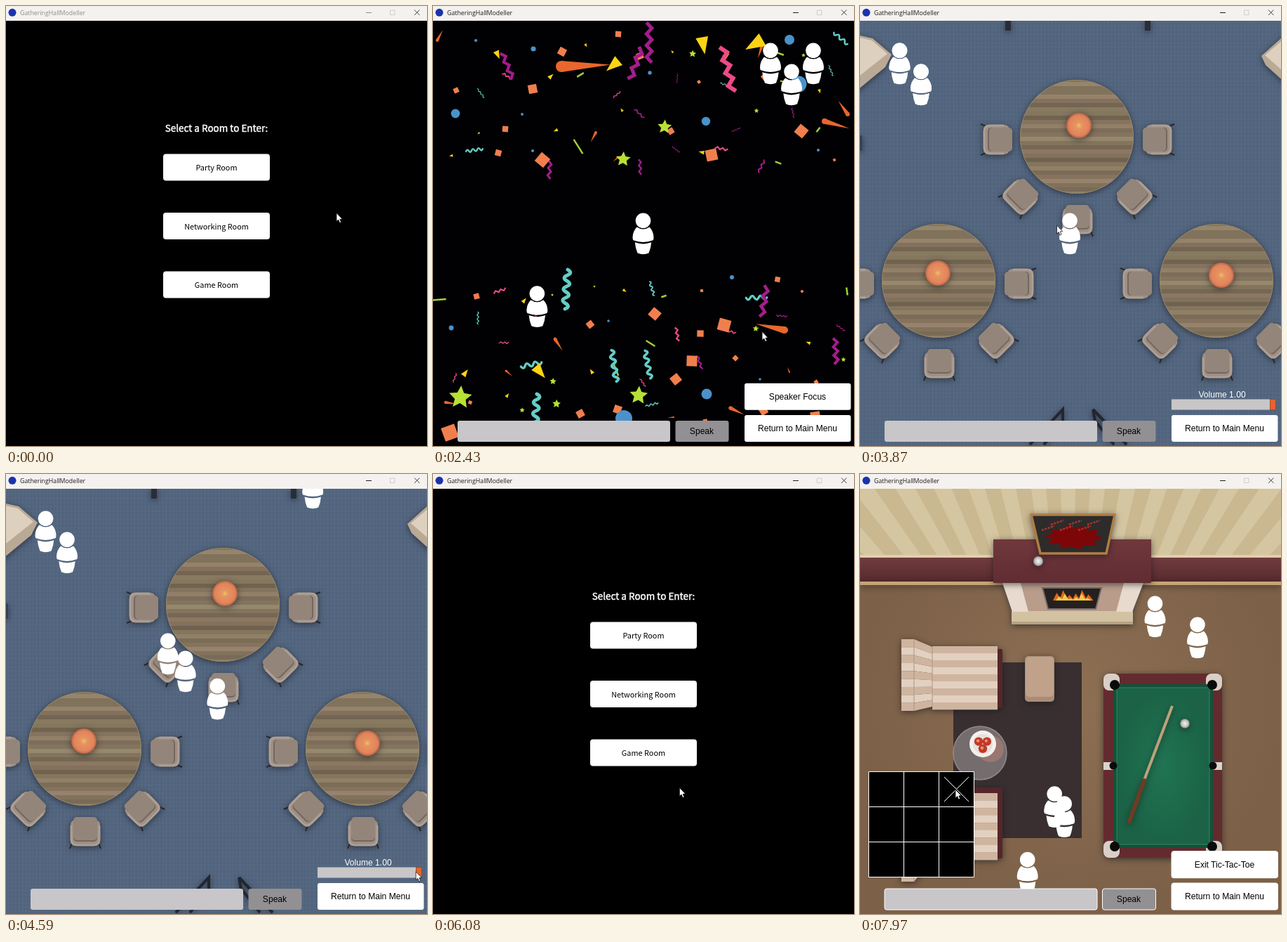
Write an HTML page that moves like this. It is 600 by 626 pixels and loops after 8000 ms.

```html
<!DOCTYPE html>
<html lang="en">
<head>
<meta charset="utf-8">
<title>Rooms</title>
<style>
html, body { margin: 0; width: 100%; height: 100%; overflow: hidden; background: #000; }
svg { display: block; width: 100%; height: 100%; }
text { text-anchor: middle; }
.ui text { font: 12.1px "Liberation Sans", Arial, sans-serif; }
.menu text { font: 10.9px "Noto Sans CJK JP", "Noto Sans CJK SC", "Noto Sans CJK", "Open Sans", sans-serif; }
.menu .head { font-size: 13.5px; fill: #fff; stroke: #fff; stroke-width: .45px; }
.bar text { font: 8.8px "Open Sans", sans-serif; text-anchor: start; }
.outlined rect { stroke: #fff; }
.shade { filter: drop-shadow(0 2px 5px rgba(18, 20, 28, .6)); }
</style>
</head>
<body>
<svg id="stage" viewBox="0 0 600 626"></svg>
<script>
const LOOP = 8000;

// ---------- drawing helpers ----------
const rect = (x, y, w, h, fill, rx = 0, more = '') =>
  `<rect x="${x}" y="${y}" width="${w}" height="${h}" rx="${rx}" fill="${fill}" ${more}/>`;
const disc = (x, y, r, fill, more = '') => `<circle cx="${x}" cy="${y}" r="${r}" fill="${fill}" ${more}/>`;
const poly = (pts, fill, more = '') => `<polygon points="${pts}" fill="${fill}" ${more}/>`;
const line = (d, stroke, w, more = '') =>
  `<path d="${d}" fill="none" stroke="${stroke}" stroke-width="${w}" ${more}/>`;
const label = (x, y, s, more = '') => `<text x="${x}" y="${y}" ${more}>${s}</text>`;
const group = (s, more = '') => `<g ${more}>${s}</g>`;
const shaded = s => group(s, 'class="shade"');
const repeat = (n, f) => Array.from({ length: n }, (_, i) => f(i)).join('');
const ring = (n, f) => Array.from({ length: n }, (_, i) => f(i)).join(' ');
const mix = (a, b, u) => a + (b - a) * u;
const polar = (x, y, r, deg) => {
  const a = deg * Math.PI / 180;
  return [+(x + r * Math.cos(a)).toFixed(1), +(y + r * Math.sin(a)).toFixed(1)];
};

function random(seed) {
  return () => (seed = (seed * 16807) % 2147483647) / 2147483647;
}

// ---------- party room ----------
const TEAL = '#64cdc6', PLUM = '#a41d8b', PINK = '#ec4a86';

// A wavy or zigzag streamer centred on x, y
function streamer(x, y, len, a, w, color) {
  const [x1, y1] = polar(x, y, -len / 2, a), round = color === TEAL;
  const n = Math.max(3, Math.round(len / (w * 1.4 + 1)));
  const at = (k, side) => polar(...polar(x1, y1, len * k / n, a), w * .75 * side, a + 90);
  let d = 'M' + at(0, round ? 0 : 1);
  for (let k = 1; k <= n; k++) {
    const side = k % 2 ? -1 : 1;
    d += round ? `Q${at(k - .5, side * 2.2)} ${at(k, 0)}` : `L${at(k, side)}`;
  }
  return line(d, color, w, round ? 'stroke-linecap="round"' : '');
}

function comet(x, y, len, a, w) {
  const tail = polar(x, y, len, a);
  return poly([polar(x, y, w / 2, a + 90), tail, polar(x, y, w / 2, a - 90)].join(' '), '#e8672c')
    + disc(x, y, w / 2, '#e8672c');
}

const dot = (x, y, r) => disc(x, y, r, '#4b92cb');
const star = (x, y, r) => poly(ring(10, i => polar(x, y, i % 2 ? r * .48 : r, i * 36 - 86)), '#b9e035');
const wedge = (x, y, r, a) => poly(ring(3, i => polar(x, y, r, a + i * 140)), '#fbd414');
const tile = (x, y, r, a) => rect(x - r, y - r, r * 2, r * 2, '#f17f4e', 0, `transform="rotate(${a} ${x} ${y})"`);
const stick = (x, y, len, a) => line(`M${polar(x, y, -len / 2, a)}L${polar(x, y, len / 2, a)}`, '#a2cf3a', 2.5);

const pieces = [
  tile, wedge, dot, star, tile, wedge,
  (x, y, r, a) => comet(x, y, r * 4, a, r),
  (x, y, r, a) => stick(x, y, r * 4, a),
  (x, y, r, a) => streamer(x, y, 8 + r * 3, a, r * .5, PLUM),
  (x, y, r, a) => streamer(x, y, 8 + r * 4, a, r * .6, TEAL),
  (x, y, r, a) => streamer(x, y, 6 + r * 3, a, r * .5, PINK)
];

// Small pieces scattered over a loose grid
function scatter(top, height, seed) {
  const rnd = random(seed), cols = 15, rows = 4;
  return repeat(cols * rows, i => {
    const x = Math.round((i % cols + .15 + .7 * rnd()) * 600 / cols);
    const y = Math.round(top + (Math.floor(i / cols) + .15 + .7 * rnd()) * height / rows);
    const r = +(1.8 + 5 * rnd() ** 1.7).toFixed(1);
    return pieces[Math.floor(rnd() * pieces.length)](x, y, r, Math.round(rnd() * 360));
  });
}

const party = () => rect(0, 21, 600, 605, '#010103') + scatter(28, 215, 71) + scatter(376, 225, 1907)
  + comet(183, 86, 70, -2, 16) + comet(501, 461, 42, 192, 10) + comet(558, 164, 37, 16, 8)
  + wedge(257, 84, 13, 0) + wedge(459, 54, 16, 10) + wedge(385, 55, 14, -60) + wedge(152, 520, 12, -90)
  + streamer(308, 52, 57, 90, 5, PLUM) + streamer(289, 82, 48, 110, 5, PLUM) + streamer(106, 85, 40, 68, 4, PLUM)
  + streamer(472, 420, 45, 99, 4.5, PLUM) + streamer(574, 491, 37, 87, 4, PLUM)
  + streamer(420, 90, 66, 77, 6, PINK) + streamer(190, 403, 56, 94, 5, TEAL) + streamer(147, 572, 40, 93, 5, TEAL)
  + streamer(258, 512, 45, 81, 4, TEAL) + streamer(306, 510, 40, 79, 3.6, TEAL)
  + tile(156, 219, 8, 40) + tile(525, 178, 7.5, 40) + tile(397, 212, 8, -12) + tile(415, 454, 8.5, 15)
  + tile(369, 505, 7.5, 2) + tile(316, 438, 7, 40) + tile(24, 607, 10, -20)
  + star(39, 557, 17) + star(293, 554, 13.5) + star(271, 218, 11) + star(330, 172, 10.5)
  + dot(521, 111, 11.5) + dot(272, 587, 12) + dot(390, 552, 7.5) + dot(508, 48, 7);

// ---------- networking room ----------
const chair = ([x, y], a) => group(
  line('M-18 14L-22 24M18 14L22 24', '#26252a', 2)
  + rect(-21, -17, 42, 37, '#9d8f84', 7)
  + line('M-20 -8V10Q-20 19 -11 19H11Q20 19 20 10V-8', '#ad9f93', 3, 'stroke-linecap="round"')
  + rect(-17, -20, 34, 34, '#74675f', 5) + rect(-17, -21, 34, 33, '#938579', 5),
  `transform="translate(${x} ${y}) rotate(${a})"`);

function table(x, y, lampX, lampY) {
  const id = 'top' + x;
  const chairs = repeat(5, i => chair(polar(x + 1, y + 4, 114, i * 45), i * 45 - 90));
  const grain = repeat(28, i => rect(x - 84, y - 84 + i * 6, 168, 6.3,
    `hsl(${35 + 3 * Math.sin(i)} 17% ${44 + 5 * Math.sin(i * 1.9) + 2 * Math.sin(i * .6)}%)`));
  return shaded(chairs) + `<clipPath id="${id}">${disc(x, y, 81)}</clipPath>`
    + shaded(group(grain, `clip-path="url(#${id})"`))
    + disc(x, y, 80.5, 'none', 'stroke="#978769"')
    + shaded(disc(lampX, lampY, 18, 'url(#lamp)'));
}

const network = () => rect(0, 21, 600, 605, '#54667f') + rect(0, 21, 600, 605, 'url(#carpet)')
  + shaded(poly('-9,40 18,46 45,69 36,87 -9,124', '#b9a995') + poly('-9,43 17,49 39,68 -9,106', '#ddd0be')
    + poly('609,38 572,71 578,84 609,112', '#b9a995') + poly('609,43 577,70 609,98', '#ddd0be'))
  + shaded(rect(207, 20, 8, 15, '#292d37') + rect(406, 20, 8, 15, '#292d37') + rect(-4, 184, 7, 22, '#353f52', 2)
    + line('M242 624L289 574V592L262 624M332 574L380 624M332 574L335 590L362 624', '#22262f', 4))
  + table(309, 186, 312, 170) + table(112, 391, 111, 380) + table(508, 391, 515, 383);

// ---------- game room ----------
// The backrest runs from an outer edge [top, bottom] to an inner one
function sofa(seatTop, seatBottom, outer, inner, legs) {
  const n = 9, h = (seatBottom - seatTop) / n, tone = i => i % 2 ? '#e2d0c0' : '#cfb5a0';
  const edge = (x, [a, b], i) => [x, mix(a, b, i / n).toFixed(1)];
  return shaded(rect(102, legs, 101, seatBottom - legs - 2, '#542629', 2)
    + repeat(n, i => rect(103, seatTop + i * h, 93, h + .3, tone(i)))
    + repeat(n, i => poly([edge(59, outer, i), edge(77, outer, i), edge(103, inner, i),
      edge(103, inner, i + 1), edge(77, outer, i + 1), edge(59, outer, i + 1)].join(' '), tone(i)))
    + line(`M77 ${outer[0]}V${outer[1]}M103 ${inner[0]}V${inner[1]}`, '#b0947e', 1));
}

function billiards() {
  const quad = f => repeat(4, i => f(i % 2, i >> 1));
  return shaded(rect(347, 284, 169, 262, '#632b2e', 9))
    + quad((u, v) => rect(347 + u * 146, 284 + v * 238, 23, 24, '#d9cfc7', 8))
    + rect(347, 410, 169, 11, '#dcd3cb')
    + rect(361, 299, 142, 233, '#14503a') + rect(366, 304, 132, 223, 'url(#felt)', 2, 'stroke="#2c8a63"')
    + quad((u, v) => disc(363 + u * 139, 300 + v * 230, 7, '#0b0b0c'))
    + disc(361, 415, 5.5, '#0b0b0c') + disc(503, 415, 5.5, '#0b0b0c')
    + shaded(line('M445 330L404 438', '#bba27c', 4) + line('M405 436L384 494', '#6c3d23', 6, 'stroke-linecap="round"')
      + disc(463, 355, 6.8, 'url(#ball)'));
}

function fireplace() {
  const flame = (n, x, w, h, fill) => repeat(n, i =>
    poly([x + i * w, 180, x + (i + .6) * w, 180 - h - 4 * Math.sin(i * 2), x + (i + 1.4) * w, 180].join(' '), fill));
  const blot = ring(28, i => {
    const a = i / 28 * 2 * Math.PI, k = 1 + .2 * Math.sin(i * 2.3);
    return [305 + 37 * k * Math.cos(a), 90 + 15 * k * Math.sin(a)].map(v => v.toFixed(1));
  });
  return shaded(poly('203,150 404,150 388,196 217,196', '#b99c8a') + rect(216, 195, 173, 19, '#d3c2a2'))
    + poly('203,155 229,155 240,196 217,196', '#e8dace') + poly('376,155 404,155 388,196 365,196', '#e8dace')
    + rect(216, 210, 173, 4, '#b6a282')
    + poly('260,162 344,162 336,192 268,192', '#25201f', 'stroke="#77706c" stroke-width="2"')
    + flame(6, 275, 9, 11, '#e0661b') + flame(6, 279, 8, 6, '#f3c94a')
    + shaded(rect(190, 93, 225, 62, 'url(#mantel)'))
    + shaded(poly('244,58 363,58 351,113 257,113', '#2d2c2b', 'stroke="#b07d45" stroke-width="3.5"'))
    + poly(blot, '#7d0708')
    + repeat(6, i => line(`M${259 + i * 13} ${80 - i % 2 * 8}l18 -6`, '#a8352f', 2.5, 'stroke-dasharray="3 1.5"'))
    + shaded(disc(254, 124, 7, 'url(#ball)'));
}

const lounge = () => rect(0, 21, 600, 605, 'url(#floor)')
  + group(rect(0, 21, 600, 97, '#d5c6a2') + repeat(27, i =>
    poly([[300, 420], polar(300, 420, 560, 193 + i * 6), polar(300, 420, 560, 196 + i * 6)].join(' '), '#cab891')),
    'clip-path="url(#wall)"')
  + rect(0, 115, 600, 4, '#e0cfaa') + rect(0, 119, 600, 34, 'url(#dado)')
  + shaded(rect(0, 153, 600, 5, '#c6a373'))
  + fireplace()
  + rect(133, 268, 183, 250, '#392f30')
  + shaded(rect(235, 259, 42, 65, '#a98d76', 5) + rect(236, 260, 40, 57, '#c0a189', 5))
  + sofa(245, 335, [235, 337], [246, 331], 249) + sofa(454, 549, [478, 580], [453, 548], 446)
  + disc(171, 397, 38, '#807779', 'opacity=".85" stroke="#a0989b" stroke-width="1.5"')
  + disc(186, 391, 19, '#a87d72', 'opacity=".7"') + disc(175, 384, 19, '#f4f0ed') + disc(175, 384, 14, '#e6e0dd')
  + repeat(3, i => {
    const [x, y] = polar(175, 384, 6.8, 90 + i * 120);
    return disc(x, y, 6.2, '#c2382b') + disc(x - 1, y - 1, 2.2, '#ee9360');
  })
  + billiards();

// ---------- interface ----------
const menuButton = (y, s) => rect(224, y, 152, 38, '#fff', 4) + label(300, y + 23.5, s);
const menu = () => rect(0, 21, 600, 605, '#000') + label(300, 178.5, 'Select a Room to Enter:', 'class="head"')
  + menuButton(210.5, 'Party Room') + menuButton(294, 'Networking Room') + menuButton(377.5, 'Game Room');

const sideButton = (y, s, more) => rect(444, y, 151.5, 38, '#fff', 3) + label(519.5, y + 23.3, s, more);
const controls = () => rect(35, 590, 303, 30, '#c8c6c9', 3) + rect(345.5, 590, 76, 30, '#929092', 3)
  + label(383, 609.3, 'Speak') + sideButton(582, 'Return to Main Menu')
  + group(sideButton(536.7, '', 'id="action"'), 'id="extra"')
  + group(label(516, 556.5, '', 'id="volume" fill="#fff"') + rect(444, 559.5, 144, 15, '#c9c6c8')
    + rect(-4, 559.5, 8, 15, '#e8632c', 0, 'id="knob" stroke="#97431f" stroke-width=".8"'), 'id="slider"');

const board = () => rect(12.5, 423.5, 150, 150, '#000')
  + repeat(4, i => line(`M${12.5 + i * 50} 423.5v150M12.5 ${423.5 + i * 50}h150`, '#fff', 1))
  + line('M120 431L155 466M155 431L120 466', '#fff', 1, 'id="mark"');

const titleBar = () => rect(0, 0, 600, 21, '#f5f1ef') + disc(9, 9.3, 5.5, '#1c32ad')
  + label(20, 12.7, 'GatheringHallModeller', 'id="caption"')
  + line('M513 9.5H521', '#222', 1, 'id="shrink"') + line('M547.5 6h6.5v6.5h-6.5z', '#cfcccb', 1)
  + line('M582 5.5L589.5 13M589.5 5.5L582 13', '#444', 1);

const stop = (at, color) => `<stop offset="${at}" stop-color="${color}"/>`;
const radial = (id, ...stops) => `<radialGradient id="${id}">${stops.join('')}</radialGradient>`;
const vertical = (id, a, b) => `<linearGradient id="${id}" x2="0" y2="1">${stop(0, a)}${stop(1, b)}</linearGradient>`;
const defs = `<defs>
${radial('lamp', stop(0, '#e8c468'), stop(.25, '#e8935f'), stop(.8, '#e0845d'), stop(1, '#b86240'))}
${radial('ball', stop(0, '#f4f4f2'), stop(.6, '#c9c9c6'), stop(1, '#8b8c89'))}
${radial('felt', stop(0, '#207452'), stop(1, '#1b6246'))}
${radial('floor', stop(0, '#8d7053'), stop(1, '#7c6048'))}
${vertical('dado', '#713b3e', '#572a2e')}${vertical('mantel', '#70383c', '#602d32')}
<clipPath id="wall">${rect(0, 21, 600, 95)}</clipPath>
<pattern id="carpet" width="5" height="6" patternUnits="userSpaceOnUse">${rect(0, 0, 2, 3, '#41536e', 0, 'opacity=".2"')}${rect(3, 3, 1, 3, '#6f809a', 0, 'opacity=".2"')}</pattern>
<g id="man" fill="#fff"><circle cy="-18.7" r="10.8"/>
<path d="M-9 -9.5Q0 -3.5 9 -9.5Q14.5 -4 15 5Q15 8 14 9.3Q0 14.5 -14 9.3Q-15 8 -15 5Q-14.5 -4 -9 -9.5Z"/>
<path d="M-11.7 12.3Q0 16.5 11.7 12.3Q11 21 8 27.5Q0 31 -8 27.5Q-11 21 -11.7 12.3Z"/></g></defs>`;

const MEN = 6;
document.getElementById('stage').innerHTML = defs + rect(0, 0, 600, 626, '#000')
  + group(menu(), 'id="menu" class="menu"') + group(party(), 'id="party"')
  + group(network(), 'id="network"') + group(lounge(), 'id="lounge"')
  + repeat(MEN, () => '<use href="#man" class="man"/>')
  + group(board(), 'id="board"') + group(controls(), 'id="controls" class="ui"')
  + group(titleBar(), 'class="bar"')
  + poly('0,0 0,12 2.7,9.6 4.6,14 6.6,13.1 4.8,8.9 8.3,8.6', '#fff', 'id="pointer" stroke="#000" stroke-width=".7"');

// ---------- motion ----------
const el = id => document.getElementById(id);
const men = [...document.querySelectorAll('.man')];
const show = (node, on) => { node.style.display = on ? '' : 'none'; };
const place = (node, [x, y]) => node.setAttribute('transform', `translate(${x.toFixed(2)} ${y.toFixed(2)})`);
const smooth = u => u * u * (3 - 2 * u);

const scenes = [[0, 'menu'], [590, 'party'], [3200, 'menu'], [3870, 'network'], [5700, 'menu'], [6390, 'lounge']];

// A person waits at x, y, then walks off at a steady speed in px/s
const person = (x, y, start = 0, vx = 0, vy = 0) => ({ x, y, start, vx, vy });
const crowd = {
  menu: [],
  party: [person(481, 82), person(542, 82), person(511, 112), person(511, 112, 920, -240, 209), person(299.5, 324)],
  network: [person(56.5, 82), person(87, 112), person(56.5, 82, 3890, 248.6, 248.3),
    person(87, 112, 3890, 240.7, 241), person(462, -30, 4493, -253, 511), person(299, 324, 3870, 3.3, -5.2)],
  lounge: [person(420.5, 203), person(481, 233), person(297, 324, 6870, -18, 136),
    person(396, 203, 6912, -99, 269), person(420.5, 203, 7258, -255, 511)]
};
const LEFT_WALL = 51;
function walk(p, t) {
  const s = Math.max(0, t - p.start) / 1000;
  return [LEFT_WALL + Math.abs(p.x + p.vx * s - LEFT_WALL), p.y + p.vy * s];
}

// Rests of the pointer: [arrives, leaves, x, y]
const rests = [
  [0, 50, 471, 294.5], [450, 620, 300, 232], [1400, 1500, 435, 179], [2970, 3200, 484, 588],
  [3600, 3900, 280.5, 312], [4640, 4700, 588, 569], [5390, 5490, 452, 571], [5660, 5720, 500, 598],
  [6260, 6420, 300, 394], [6960, 7000, 433.5, 247], [7340, 7420, 490, 550], [7840, LOOP, 136, 449]
];
function pointerAt(t) {
  const i = rests.findIndex(r => t <= r[1]), [arrives, , x, y] = rests[i];
  if (t >= arrives) return [x, y];
  const [, left, px, py] = rests[i - 1], u = smooth((t - left) / (arrives - left));
  return [mix(px, x, u), mix(py, y, u)];
}

const dragged = t => t < 4700 ? 1 : Math.min(1, (pointerAt(Math.min(t, 5450))[0] - 444.4) / 144);

function draw(t) {
  const scene = scenes.filter(s => s[0] <= t).pop()[1];
  for (const name in crowd) show(el(name), name === scene);

  men.forEach((man, i) => {
    const p = crowd[scene][i];
    show(man, p);
    if (p) place(man, walk(p, t));
  });

  const playing = t >= 7400, inNetwork = scene === 'network';
  show(el('controls'), scene !== 'menu');
  show(el('extra'), !inNetwork);
  show(el('slider'), inNetwork);
  show(el('board'), playing);
  show(el('mark'), t >= 7890);
  el('controls').classList.toggle('outlined', playing);
  el('action').textContent = scene === 'party' ? 'Speaker Focus' : (playing ? 'Exit' : 'Play') + ' Tic-Tac-Toe';

  const volume = dragged(t);
  el('volume').textContent = 'Volume ' + volume.toFixed(2);
  place(el('knob'), [444.4 + 144 * volume, 0]);

  place(el('pointer'), pointerAt(t));
  show(el('pointer'), t < 3020 || t >= 3200);

  const ink = t >= 50 ? '#1d1b1b' : '#8e8b8a';
  el('caption').setAttribute('fill', ink);
  el('shrink').setAttribute('stroke', ink);
}

const start = performance.now();
function tick() {
  draw((performance.now() - start) % LOOP);
  requestAnimationFrame(tick);
}
tick();
</script>
</body>
</html>
```
